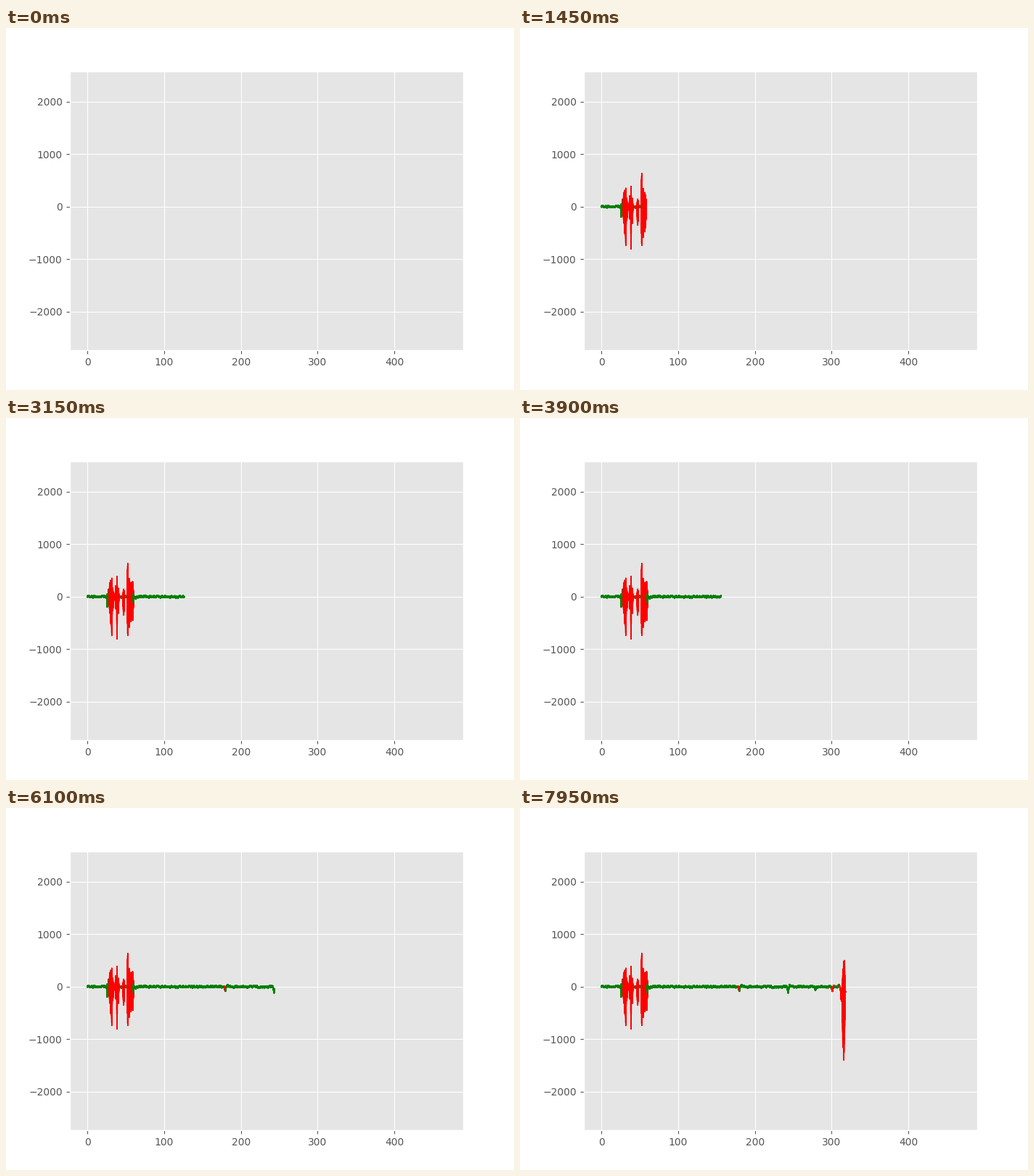
Write a matplotlib script that moves like this. It is 700 by 500 pixels and loops after 8000 ms.

```python
import numpy as np
import matplotlib.pyplot as plt
from matplotlib.animation import FuncAnimation

plt.style.use("ggplot")

FRAMES, INTERVAL = 160, 50
STEP, RATE = 2, 50          # time units per frame, samples per unit
CHUNK = STEP * RATE
RED_SPANS = [(28, 44), (46, 50), (52, 60), (178, 180), (300, 304), (310, 318)]

# time, lowest and highest swing, width
SHOCKS = [
    (25.8, -200, 60, 0.5), (27.5, -170, 150, 0.5), (29.1, -310, 285, 0.4),
    (30.6, -530, 320, 0.4), (31.8, -750, 355, 0.5), (33.0, -300, 160, 0.5),
    (36.8, -240, 220, 0.4), (38.6, -815, 410, 0.35), (40.2, -320, 165, 0.6),
    (47.2, -345, 155, 0.7), (52.6, -830, 635, 0.35), (54.4, -590, 350, 1.0),
    (56.6, -480, 270, 1.0), (58.8, -470, 290, 1.1),
    (314.7, -1080, 445, 0.5), (315.9, -1430, 500, 0.35),
    (316.6, -1000, 550, 0.5),
]
# time and height of slow bumps in the trace
BUMPS = [(63, -20), (75.5, 25), (179.6, -75), (183, 25), (243.2, -105),
         (245.5, 38), (278.8, -68), (301, -80), (302.5, 25), (309.3, 28),
         (312.6, -210), (313.8, -200), (317.7, -90)]


def bell(t, centre, width):
    return np.exp(-((t - centre) / width) ** 2)


def make_signal():
    rng = np.random.default_rng(7)
    t = np.arange((FRAMES - 1) * CHUNK + 1) / RATE
    knots = np.arange(0, t[-1] + 2, 1.2)
    drift = np.interp(t, knots, rng.uniform(-13, 13, knots.size))
    for centre, height in BUMPS:
        drift += height * bell(t, centre, 0.9)

    low, high = np.full(t.size, -13.0), np.full(t.size, 13.0)
    for centre, bottom, top, width in SHOCKS:
        shape = bell(t, centre, width)
        low = np.minimum(low, bottom * shape)
        high = np.maximum(high, top * shape)

    reach = 1 - 0.5 * rng.random(t.size) ** 2
    return t, drift + reach * np.where(np.arange(t.size) % 2, high, low)


def colour(start):
    return "red" if any(a <= start < b for a, b in RED_SPANS) else "green"


fig, ax = plt.subplots(figsize=(7, 5), dpi=100)
ax.set_xlim(-23.315, 489.615)
ax.set_ylim(-2733, 2577)

time, level = make_signal()
pieces = []
for n in range(FRAMES - 1):
    part = slice(n * CHUNK, (n + 1) * CHUNK + 1)
    pieces += ax.plot(time[part], level[part], color=colour(n * STEP), lw=1.2)


def update(frame):
    for n, piece in enumerate(pieces):
        piece.set_visible(n < frame)
    return pieces


anim = FuncAnimation(fig, update, frames=FRAMES, interval=INTERVAL,
                     repeat=True, repeat_delay=0)
plt.show()
```
